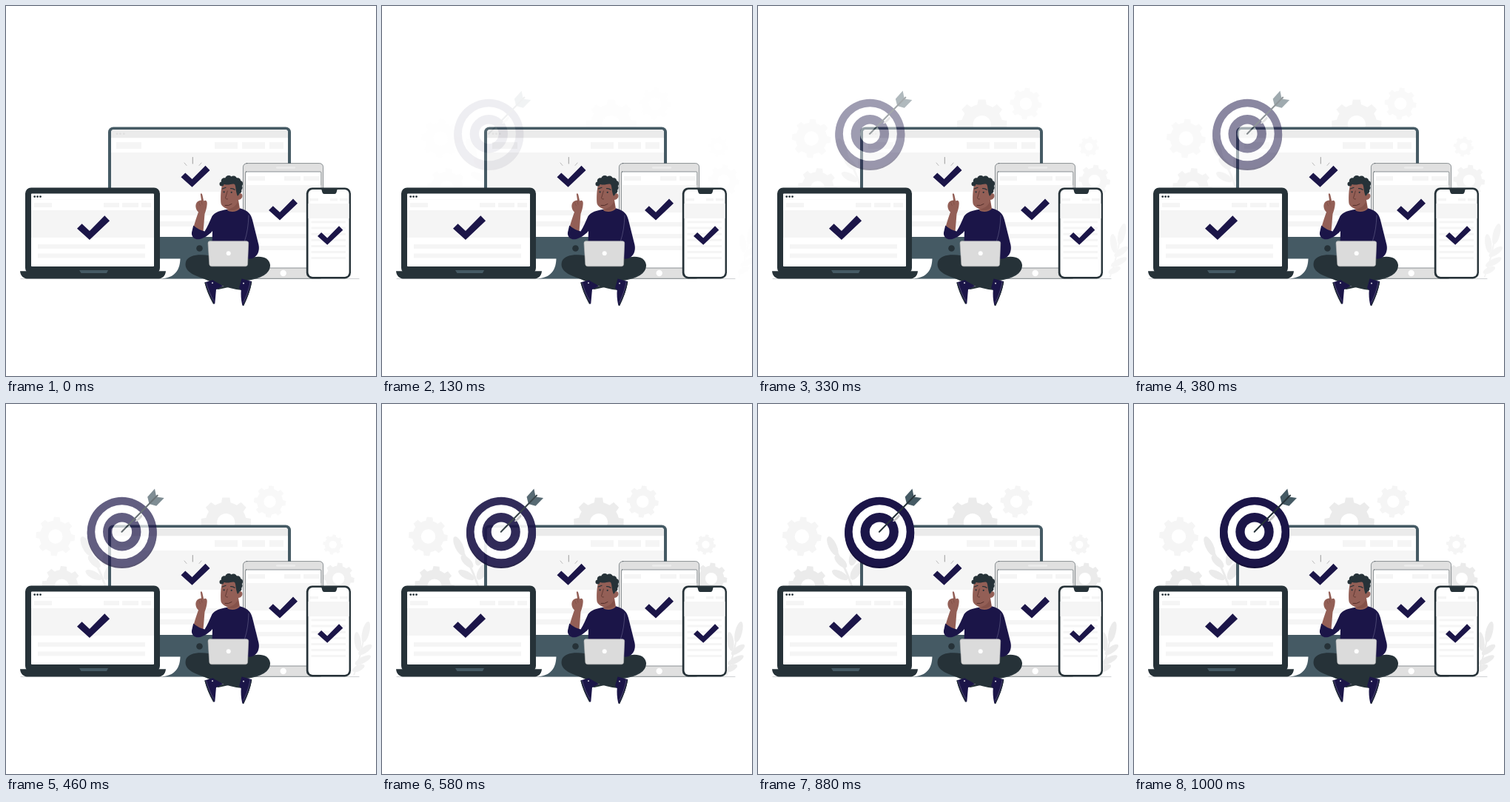
Animation, 500 px wide and 500 px high, one loop 1.04 s. Source, as an HTML page with a canvas:

```html
<!DOCTYPE html>
<html lang="en">
<head>
<meta charset="utf-8">
<title>Goals on every device</title>
<style>
html, body { margin: 0; width: 100%; height: 100%; overflow: hidden; background: #fff; }
canvas { display: block; width: 500px; height: 500px; }
</style>
</head>
<body>
<canvas id="stage"></canvas>
<script>
const SIZE = 500, LOOP = 1040, FPS = 24, SLIDE = 20;
const NAVY = '#1b1548', DARK = '#263238', STEEL = '#455a64', SKIN = '#935f56';
const PALE = '#f5f5f5', MIST = '#ebebeb', GREY = '#e0e0e0', WHITE = '#fff';

const dpr = window.devicePixelRatio || 1;
const view = document.getElementById('stage');

function makeContext(canvas) {
  canvas.width = canvas.height = SIZE * dpr;
  const c = canvas.getContext('2d');
  c.scale(dpr, dpr);
  c.lineCap = c.lineJoin = 'round';
  return c;
}
const newLayer = () => makeContext(document.createElement('canvas'));

// Drawing helpers
function path(c, d, fill, stroke, width = 1) {
  const p = new Path2D(d);
  if (fill) { c.fillStyle = fill; c.fill(p); }
  if (stroke) { c.strokeStyle = stroke; c.lineWidth = width; c.stroke(p); }
}
function box(c, x1, y1, x2, y2, fill, r = 0, stroke, width) {
  c.beginPath();
  c.roundRect(x1, y1, x2 - x1, y2 - y1, r);
  c.fillStyle = fill;
  c.fill();
  if (stroke) { c.strokeStyle = stroke; c.lineWidth = width; c.stroke(); }
}
function disc(c, x, y, r, fill) {
  c.beginPath();
  c.arc(x, y, r, 0, Math.PI * 2);
  c.fillStyle = fill;
  c.fill();
}
function tabs(c, y1, y2, spans) {
  spans.forEach(([a, b]) => box(c, a, y1, b, y2, PALE));
}
function check(c, x, y, s) {
  c.save();
  c.translate(x, y);
  c.scale(s, s);
  path(c, 'M0 15.5 L5.8 9.8 L15 18.3 L33 0 L39 6.2 L15 29 Z', NAVY);
  c.restore();
}
function gear(c, x, y, r, hole, fill, turn = 0) {
  const teeth = 8, step = Math.PI * 2 / teeth, root = r * 0.81;
  c.beginPath();
  for (let i = 0; i < teeth; i++) {
    const a = turn - Math.PI / 2 + i * step;
    [[-0.29, root], [-0.19, r], [0.19, r], [0.29, root]].forEach(([k, d]) =>
      c.lineTo(x + Math.cos(a + k * step) * d, y + Math.sin(a + k * step) * d));
    c.arc(x, y, root, a + 0.29 * step, a + 0.71 * step);
  }
  c.closePath();
  c.moveTo(x + hole, y);
  c.arc(x, y, hole, 0, Math.PI * 2, true);
  c.fillStyle = fill;
  c.fill('evenodd');
}
function leaf(c, x, y, rx, ry, deg) {
  c.beginPath();
  c.ellipse(x, y, rx, ry, deg * Math.PI / 180, 0, Math.PI * 2);
  c.fillStyle = MIST;
  c.fill();
}

function drawBackdrop(c) {
  gear(c, 60.5, 179, 26.5, 9.7, PALE, 0.08);
  gear(c, 69, 246, 27, 9.5, MIST, 0.1);
  gear(c, 291, 160, 34, 12, MIST);
  gear(c, 350.3, 132, 21.7, 8.2, PALE, 0.1);
  gear(c, 435.5, 190, 13.7, 5.2, PALE, 0.15);
  gear(c, 443, 236, 21.5, 8, MIST, 0.1);

  path(c, 'M100 188 Q116 212 128 246', null, MIST, 3);
  leaf(c, 102, 192, 5.5, 14, -25);
  leaf(c, 131, 205, 6, 14, 18);
  leaf(c, 113, 213, 5, 11, -45);
  leaf(c, 134, 226, 6, 13, 30);
  leaf(c, 112, 231, 5, 12, -62);

  path(c, 'M479 305 Q474 340 464 366', null, MIST, 2);
  leaf(c, 480, 308, 4.8, 14.5, 14);
  leaf(c, 469, 321, 4.5, 13, -8);
  leaf(c, 479, 332, 4.2, 11, 55);
  leaf(c, 476, 346, 4.2, 12, 62);
  leaf(c, 470, 357, 4, 9, 65);
}

function drawMonitor(c) {
  box(c, 138, 163.5, 385, 341.5, STEEL, 7);
  path(c, 'M235.5 340 C235.5 356 229 368 208 368.5 H316 C300 364 290 352 289 340 Z', STEEL);
  box(c, 142, 167, 381, 312, WHITE, [4, 4, 0, 0]);
  box(c, 142, 167, 381, 178.3, MIST, [4, 4, 0, 0]);
  [150, 154.5, 159.3].forEach(x => disc(c, x, 172.7, 1.4, GREY));
  tabs(c, 184, 193, [[149, 183], [282, 313], [319, 350], [356, 375]]);
  box(c, 142, 198, 381, 251, PALE);
  tabs(c, 276, 283, [[160, 362]]);
  tabs(c, 291, 298, [[160, 362]]);
  disc(c, 261.5, 327.5, 4.3, DARK);
  path(c, 'M252.3 204.5 V213', null, '#777', 0.7);
  path(c, 'M241 212 L244 215.5 M264 212 L261 215.5', null, '#aaa', 0.8);
  check(c, 236.5, 215.8, 1);
}

function drawTablet(c) {
  box(c, 320.4, 212.6, 428.6, 368.3, GREY, 5, DARK, 0.5);
  box(c, 365, 217, 391, 219.8, MIST, 1.4);
  box(c, 323.6, 224, 425.8, 354, WHITE, 1, DARK, 0.5);
  tabs(c, 230, 236, [[327, 350], [376, 398], [402, 423]]);
  box(c, 324, 242, 425.5, 279, PALE);
  [292, 308, 324].forEach(y => tabs(c, y, y + 6, [[331, 418]]));
  disc(c, 374.7, 361, 4.2, WHITE);
  check(c, 355, 260.5, 1);
}

function drawPhone(c) {
  box(c, 405.8, 245.5, 466, 368.4, DARK, 8);
  box(c, 408.5, 248, 463.6, 366, WHITE, 6);
  path(c, 'M426 247 H448 L446.5 252 Q446 254 444 254 H430 Q428 254 427.5 252 Z', DARK);
  tabs(c, 260, 263.5, [[410, 422], [438, 448], [451, 462]]);
  box(c, 408.5, 267, 463.6, 287, PALE);
  for (let i = 0; i < 7; i++) tabs(c, 290.5 + i * 8.1, 293.5 + i * 8.1, [[412.5, 459]]);
  check(c, 421, 297.3, 0.88);
}

function drawLaptop(c) {
  box(c, 26, 245.5, 208, 362, DARK, 8);
  box(c, 34, 253.5, 200, 352, WHITE, 1);
  [38.7, 42.6, 46.5].forEach(x => disc(c, x, 257.6, 1.4, DARK));
  box(c, 34, 261.5, 200, 262, PALE);
  tabs(c, 266, 272, [[38, 62], [132, 153], [157, 179], [183, 196]]);
  box(c, 34, 276, 200, 313, PALE);
  tabs(c, 322, 328, [[43, 188]]);
  tabs(c, 334.5, 340.5, [[43, 188]]);
  path(c, 'M19 358.3 H216 C215.5 365 211 368.6 205 368.6 H30 C24 368.6 19.5 365 19 358.3 Z', DARK);
  path(c, 'M99 357 H138 L136 361 H101.5 Z', STEEL);
  check(c, 96, 283.3, 1.13);
}

function drawPerson(c) {
  // legs and shoes
  path(c, 'M276 337.5 C262 335 247 336 243.2 345 C240 356 249 362 263 367 C278 373 298 382 319 384 L326 371 C345 368 357 362 357 350 C356 339 343 336 328 341 Z', DARK);
  path(c, 'M282 382 L328 368 L310 378 L287 383 Z', DARK);
  path(c, 'M268.5 373.5 L279.5 370.3 C283 373 288 375 293 378.5 L284 383 L282.3 402 Q281 403.5 279.5 401.5 C275 393 271 384 268.5 373.5 Z', NAVY);
  path(c, 'M269 374 C271.5 384 275.5 393 280.5 402', null, DARK, 1.2);
  path(c, 'M270.7 374 C273 383 276.5 391 280.5 398', null, '#8d8aa4', 0.4);
  path(c, 'M318.5 368.5 L332.2 372.3 C330 386 325 397 321.5 404.5 Q320 406 319.2 404 C317.5 396 317.3 390 317.7 384 L315 381 Z', NAVY);
  path(c, 'M331.7 373 C329.5 386 325 396 320.7 404.5', null, DARK, 1.2);
  path(c, 'M330 373 C328 384 324.5 393 321 400', null, '#8d8aa4', 0.4);
  disc(c, 279, 374.2, 1, '#d8d7e0');
  disc(c, 321, 374.8, 1, '#d8d7e0');
  path(c, 'M326 370.5 C337 368 347 365 352 360', null, '#3c4a51', 0.4);

  // raised hand
  path(c, 'M262.8 254 C264 252.3 265.2 254 265.5 256 L267.2 263.5 C270 261.5 272.2 264 271.7 267.5 C271.5 272 270 277 268.5 281 L266.5 305 L253 301 C255 293 257.5 285 260 278.5 C256 275 255.5 269 257.5 266 C259.5 263 262 263 264 262.5 Z', SKIN);
  path(c, 'M264 263 L265 268 M260.5 265.5 L262.5 270', null, '#6e4139', 0.4);

  // sweater
  path(c, 'M298 275 L315 273 C327 276 331 281 333 289 L341.5 323 C343 331 340 337 335 340 C332 342 328 342 325 341 L278 341 L279 304 C274 310 267 314 261 315.3 C254 316 250.3 311 251 306 L253.2 296.5 Q260 302.5 268.5 304.5 C272 299 275 292 278.5 284 C283 278 290 276.5 298 275 Z', NAVY);
  path(c, 'M328 283 C327.5 296 326 307 322.5 317.5', null, '#77749a', 0.5);

  // head
  path(c, 'M292 242 C290 250 289.8 261 290.5 267 C292 271 296 273 299.5 274.5 L299 276 C304 279.5 312 278 316 274 L314 262 C318 262 320.5 258 319 254.5 C318 252.5 315 253 314 255 L314 240 C306 234 297 236 292 242 Z', SKIN);
  path(c, 'M300 274.5 C306 273.5 311 270 313.5 264 L315 272 C310 277 304 277 300 274.5 Z', '#85524a');
  [[291.5, 240.5, 3], [295, 236.5, 4.2], [301, 234, 5], [307.5, 234.3, 4.8], [313, 236.5, 4.2],
   [316, 240, 4], [316, 245.5, 3.5], [315.3, 250, 3.1]].forEach(([x, y, r]) => disc(c, x, y, r, DARK));
  path(c, 'M293 240 C300 244 305 239 309 241 C311 244 310 250 313 257 L317 252 L317 238 L302 233 Z', DARK);
  path(c, 'M292.5 247 L297 245.3 M303.5 246.7 Q306.5 246 309 248.3', null, DARK, 1.2);
  disc(c, 294.6, 251.3, 1.1, DARK);
  disc(c, 304.7, 251.8, 1.1, DARK);
  path(c, 'M299.3 250 L296.5 259.5 Q297 261.5 299.5 261', null, '#4e2b26', 0.7);
  path(c, 'M296 269.5 Q301 270.5 305 267.5', null, '#4e2b26', 0.9);

  // small computer
  path(c, 'M275.5 317.8 H325 Q327.8 317.8 327.7 320.5 L326.5 349 Q326.4 351.8 323.5 351.8 H278 Q275 351.8 274.8 349 L273 320.5 Q272.8 317.8 275.5 317.8 Z', '#dbdbdb', '#b5b5b5', 0.6);
  disc(c, 300.7, 334.3, 3, WHITE);
}

function drawTarget(c) {
  const x = 163, y = 172.8;
  disc(c, x, y + 2.3, 47, '#140f38');
  disc(c, x, y, 47, NAVY);
  disc(c, x, y, 36.5, WHITE);
  disc(c, x, y, 25.7, NAVY);
  disc(c, x, y, 13.4, WHITE);
  path(c, 'M180.5 158.5 L189.5 149 L190.5 152 Q187 157 182.5 159 Z', '#c7c7c7');
  path(c, 'M197.5 125.5 L207.3 114.5 L209.3 124.5 L199.8 135 Z', STEEL);
  path(c, 'M199.8 135 L210 125.5 L220 127 L209.5 137.7 Z', STEEL);
  path(c, 'M162.7 172.8 L211 123.5', null, DARK, 2);
}

function drawStatic(c) {
  path(c, 'M20 368.6 H477', null, '#a9aeb1', 0.6);
  [drawMonitor, drawTablet, drawPhone, drawLaptop, drawPerson].forEach(draw => draw(c));
}

// cubic-bezier(.36, -.01, .5, 1.38), solved by bisection
function ease(t) {
  const curve = (s, a, b) => 3 * (1 - s) ** 2 * s * a + 3 * (1 - s) * s * s * b + s ** 3;
  if (t >= 1) return 1;
  let lo = 0, hi = 1;
  for (let i = 0; i < 24; i++) {
    const mid = (lo + hi) / 2;
    if (curve(mid, 0.36, 0.5) < t) lo = mid; else hi = mid;
  }
  return curve(lo, -0.01, 1.38);
}

const screen = makeContext(view), moving = newLayer(), still = newLayer();
drawStatic(still);

function blit(layer, alpha) {
  screen.globalAlpha = alpha;
  screen.drawImage(layer.canvas, 0, 0, SIZE, SIZE);
  screen.globalAlpha = 1;
}
function slideIn(draw, dx, alpha) {
  moving.clearRect(0, 0, SIZE, SIZE);
  moving.save();
  moving.translate(dx, 0);
  draw(moving);
  moving.restore();
  blit(moving, alpha);
}

function render(ms) {
  const tick = Math.floor((Math.floor(ms / 10) * 10 + 4.9) * FPS / 1000);
  const shown = tick >= 3;
  const e = shown ? ease(tick / FPS + 0.012) : 0;
  const alpha = Math.max(0, Math.min(1, e));
  const dx = SLIDE * (1 - e);

  screen.fillStyle = WHITE;
  screen.fillRect(0, 0, SIZE, SIZE);
  if (shown) slideIn(drawBackdrop, dx, alpha);
  blit(still, 1);
  if (shown) slideIn(drawTarget, -dx, alpha);
}

const start = performance.now();
function loop() {
  render((performance.now() - start) % LOOP);
  requestAnimationFrame(loop);
}
loop();
</script>
</body>
</html>
```
